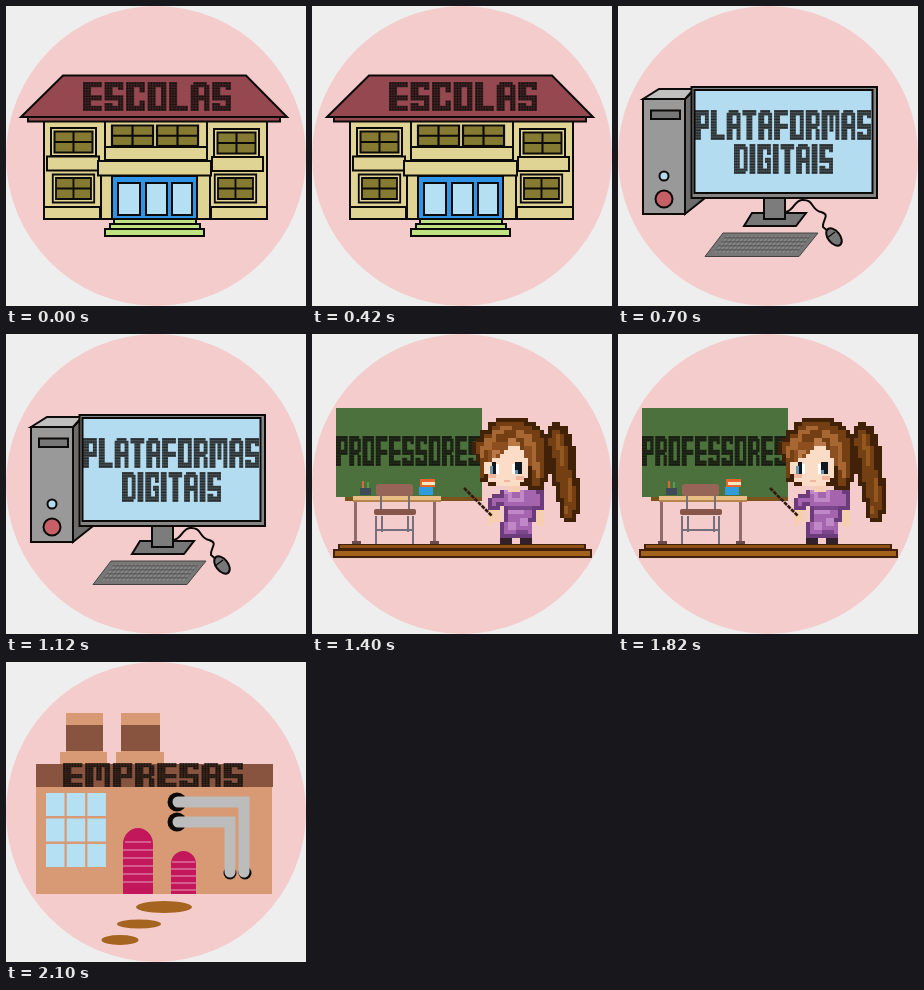
An HTML page that plays this animation: 300x300 px, repeating every 2800 ms.

```html
<!DOCTYPE html>
<html lang="pt">
<head>
<meta charset="utf-8">
<title>Escolas, plataformas digitais, professores, empresas</title>
<style>
  html, body { margin: 0; width: 100%; height: 100%; overflow: hidden; background: #eee; }
  svg { display: block; width: 100%; height: 100%; }
  .scene { visibility: hidden; animation: show 2800ms step-end infinite; }
  .s2 { animation-delay: -2100ms; }
  .s3 { animation-delay: -1400ms; }
  .s4 { animation-delay: -700ms; }
  @keyframes show { 0% { visibility: visible; } 25%, 100% { visibility: hidden; } }
  .ink { stroke: #0c0a08; stroke-width: 2; }
  .px { shape-rendering: crispEdges; }
</style>
</head>
<body>
<svg viewBox="0 0 300 300">
  <defs>
    <pattern id="dots" width="1" height="1" patternUnits="userSpaceOnUse">
      <rect width="1" height="1" fill="#0c0a08" opacity=".3"/>
      <rect x=".08" y=".08" width=".8" height=".8" fill="#0c0a08"/>
    </pattern>
    <pattern id="keys" width="4" height="4" patternUnits="userSpaceOnUse" patternTransform="skewX(-38)">
      <rect width="4" height="4" fill="#5c5c5c"/>
      <rect x=".5" y=".5" width="2.8" height="2.6" fill="#8c8c8c"/>
    </pattern>
    <g id="pane">
      <rect class="ink" width="38" height="21" fill="#857a31"/>
      <path class="ink" d="M19 0V21M0 10.5H38"/>
    </g>
    <g id="window">
      <rect class="ink" x="-3.5" y="-3.5" width="45" height="28" fill="#e0d495"/>
      <use href="#pane"/>
    </g>
  </defs>
  <rect width="300" height="300" fill="#eee"/>
  <circle cx="150" cy="150" r="150" fill="#f4cccc"/>

  <!-- School -->
  <g class="scene s1">
    <g class="ink" fill="#e0d495">
      <path d="M38 112H261V213H38Z"/>
      <path d="M99 116V140M201 116V140M95 169V213M204 169V213" fill="none"/>
      <path d="M22 111H274V115.500H22Z" fill="#964850"/>
      <path d="M15 111L57 69.500H240L281 111Z" fill="#964850"/>
    </g>
    <use href="#window" x="48.500" y="125.500"/>
    <use href="#window" x="211.500" y="126.500"/>
    <use href="#window" transform="translate(50 172) scale(.92 1)"/>
    <use href="#window" transform="translate(212 172) scale(.92 1)"/>
    <use href="#pane" transform="translate(106 119.500) scale(1.08 .97)"/>
    <use href="#pane" transform="translate(151 119.500) scale(1.08 .97)"/>
    <g class="ink" fill="#e0d495">
      <path d="M41 150.500H93V164.500H41ZM206 151H257V165H206ZM38 201H94V213H38ZM205 201H261V213H205Z"/>
      <path d="M99 141H201V154H99ZM92 155H205V169.500H92Z"/>
      <path d="M106 170H191V213H106Z" fill="#2f94e6"/>
      <path d="M112 177H134V209H112ZM140 177H161V209H140ZM166 177H186V209H166Z" fill="#b5dff2"/>
      <path d="M108 213H190V218H108ZM104 218H194V223H104ZM99 223H198V230H99Z" fill="#bfe383"/>
    </g>
    <g data-word="ESCOLAS" data-box="77 76 148 29"></g>
  </g>

  <!-- Computer -->
  <g class="scene s2">
    <g class="ink">
      <path d="M67 93L74 86V192H87L67 208Z" fill="#6c6c6c"/>
      <path d="M25 93L41 83H76L67 93Z" fill="#c0c0c0"/>
      <path d="M25 93H67V208H25Z" fill="#999"/>
      <path d="M33 104.500H62V113H33Z" fill="#777"/>
      <circle cx="46" cy="170" r="4.500" fill="#b4dcf0"/>
      <circle cx="46" cy="193" r="8.500" fill="#c75f66"/>
      <path d="M134 207H188L178 220H126Z" fill="#777"/>
      <path d="M146 192H167V213H146Z" fill="#7c7c7c"/>
      <path d="M73.500 81H259V192H73.500Z" fill="#858585"/>
      <path d="M76.500 84H254.500V187H76.500Z" fill="#b4dcf0"/>
      <path d="M168 206C176 204 176 195 184 194C196 193 193 204 203 206C213 209 204 214 205 221L211 226" fill="none"/>
      <ellipse cx="216" cy="231" rx="6" ry="10" transform="rotate(-38 216 231)" fill="#777"/>
      <path d="M209 232L217 226" stroke-width="1.300"/>
    </g>
    <path d="M105 227H200L181 250.500H87Z" fill="#777" stroke="#444"/>
    <path d="M108 230H193L179 247H95Z" fill="url(#keys)"/>
    <g data-word="PLATAFORMAS" data-box="77 104 176 30"></g>
    <g data-word="DIGITAIS" data-box="116 138 99 30"></g>
  </g>

  <!-- Classroom -->
  <g class="scene s3">
    <path d="M24 74H170V163H24Z" fill="#4c713c"/>
    <g data-word="PROFESSORES" data-box="24 102 144 30"></g>
    <g class="px">
      <path d="M33 163H170V167H33Z" fill="#7b531f"/>
      <path d="M26 210H274V216H26ZM21 215H280V224H21Z" fill="#42210c"/>
      <path d="M28 211H272V214H28Z" fill="#8c5014"/>
      <path d="M23 217H278V222H23Z" fill="#a3621c"/>
      <path d="M42 168H45V208H42ZM121 168H124V208H121Z" fill="#916a6c"/>
      <path d="M40 207H49V210H40ZM118 207H127V210H118Z" fill="#6b4a4c"/>
      <path d="M41 162H129V168H41Z" fill="#e8bd83"/>
      <path d="M41 166H129V168H41Z" fill="#b5844f"/>
      <path d="M48 154H59V161H48Z" fill="#3d4b58"/>
      <path d="M50 147H52V154H50Z" fill="#d66b3c"/>
      <path d="M55 148H57V154H55Z" fill="#5a9a50"/>
      <path d="M107 153H121V161H107Z" fill="#2f9bd8"/>
      <path d="M108 145H123V153H108Z" fill="#e8652d"/>
      <path d="M110 148H123V151H110Z" fill="#f6e6c2"/>
    </g>
    <path d="M64 210V182M101 210V182M70 198V182M96 198V182M64 196H101M69 160V178M97 160V178" stroke="#75707c" stroke-width="2"/>
    <rect x="64" y="150" width="37" height="12" rx="3" fill="#966558"/>
    <rect x="62" y="175" width="42" height="6" rx="2" fill="#86564a"/>
    <!-- Teacher, on a grid of 4 px cells -->
    <g class="px" transform="translate(160 84) scale(4)">
      <path d="M17 4H19V2H20V1H22V2H24V4H25V7H26V15H27V24H26V26H23V25H22V21H21V17H20V14H17Z" fill="#412108"/>
      <path d="M20 3H22V4H23V7H24V13H25V17H26V23H25V25H23V20H22V16H21V10H20V7H19V5H20Z" fill="#743f12"/>
      <path d="M21 4H22V7H23V12H22V8H21ZM24 15H25V21H24ZM23 22H24V24H23Z" fill="#955720"/>
      <path d="M6 0H14V1H16V2H17V3H18V5H19V16H18V18H14V17H4V16H2V11H1V9H0V6H1V5H2V3H4V1H6Z" fill="#412108"/>
      <path d="M6 1H13V2H15V3H17V5H18V15H17V17H15V8H12V7H5V9H4V12H3V15H2V9H1V6H3V4H5V2H6Z" fill="#743f12"/>
      <path d="M7 2H10V3H8V4H6V6H5V8H3V10H2V7H3V5H5V3H7ZM11 3H13V4H15V6H16V11H17V15H16V13H15V7H13V5H11Z" fill="#a76733"/>
      <path d="M8 7H12V8H13V9H14V15H13V16H12V17H6V16H4V14H3V11H4V10H6V9H8Z" fill="#fbdcc6"/>
      <path d="M5 6H9V8H8V9H7V10H5V11H4V8H5ZM13 7H15V12H14V10H13Z" fill="#8d4f20"/>
      <path d="M5 8H7V9H6V10H5ZM9 5H11V6H12V7H9Z" fill="#b97845"/>
      <path d="M4 14H6V15H4ZM11 14.500H13V15.500H11ZM8 15.500H9.500V16H8Z" fill="#f1b49f"/>
      <path d="M5 11H6V14H5ZM10.700 11H12.600V14H10.700Z" fill="#101820"/>
      <path d="M4.500 12H5.300V14H4.500ZM10.700 13H11.500V14H10.700Z" fill="#6d96ae"/>
      <path d="M6 11.500H6.700V14H6ZM10 11.500H10.700V14H10Z" fill="#fff"/>
      <path d="M7 18H9V17H12V18H18V23H16V26H15V30H7V26H8V22H7V23H4V20H5V19H7Z" fill="#6b3b7b"/>
      <path d="M8 18H16V19H17V22H15V25H14V26H15V29H8V26H9V22H8V21H6V22H5V20H8Z" fill="#a465ae"/>
      <path d="M8 18H10V20H12V18H13V21H9V19H8ZM9 23H13V24H9ZM9 26H11V28H9ZM12 25H14V27H12Z" fill="#c188c7"/>
      <path d="M9 22H15V23H9ZM11 28H14V29H11Z" fill="#7c468b"/>
      <path d="M9 17H12V18.500H9ZM4 23H7V26H5V27H4ZM16 23H18V27H16Z" fill="#f5cfb0"/>
      <path d="M7 30H10V31.500H7ZM12 30H15V31.500H12Z" fill="#33202a"/>
    </g>
    <path d="M152 154L180 182" stroke="#30190f" stroke-width="2.600" stroke-dasharray="4 1"/>
  </g>

  <!-- Factory -->
  <g class="scene s4">
    <path d="M60 51H97V90H101V102H54V90H60ZM115 51H154V90H158V102H110V90H115ZM30 124H266V232H30Z" fill="#d79a74"/>
    <path d="M60 63H97V89H60ZM115 63H154V89H115ZM30 102H267V125H30Z" fill="#88543f"/>
    <g id="panes" fill="#b5dff2"></g>
    <g fill="#0c0a08">
      <circle cx="171" cy="140" r="9.500"/><circle cx="171" cy="160" r="9.500"/>
      <circle cx="224" cy="211" r="6.500"/><circle cx="239" cy="211" r="6.500"/>
    </g>
    <path d="M172 140H238V210M172 160H224V210" fill="none" stroke="#bcbcbc" stroke-width="11" stroke-linecap="round"/>
    <path d="M117 232V182A15 16 0 0 1 147 182V232ZM165 232V202A12.500 13 0 0 1 190 202V232Z" fill="#c2185b"/>
    <path d="M119 180H145M117 188H147M117 196H147M117 204H147M117 212H147M117 220H147M166 200H189M165 207H190M165 214H190M165 221H190M165 228H190" stroke="#d65a8b" stroke-width="2"/>
    <g fill="#a5641f">
      <ellipse cx="158" cy="245" rx="28" ry="6"/>
      <ellipse cx="133" cy="262" rx="22" ry="4.500"/>
      <ellipse cx="114" cy="278" rx="18.500" ry="5"/>
    </g>
    <g data-word="EMPRESAS" data-box="57 101 180 24"></g>
  </g>
</svg>
<script>
  // Lettering is assembled from bars on a grid 11 cells high.
  const bars = {
    a: 'M0 0h3v6h-3z', b: 'M0 5h3v6h-3z', c: 'M5 0h2v6h-2z', d: 'M5 5h2v6h-2z',
    t: 'M0 0h7v2h-7z', m: 'M0 5h7v2h-7z', u: 'M0 9h7v2h-7z',
    p: 'M5 0h2v4h-2z', q: 'M5 7h2v4h-2z', n: 'M0 5h6v2h-6z',
    s: 'M5 0h2v3h-2z', z: 'M0 8h3v3h-3z',
    r: 'M1 0h5v2h-5z', l: 'M0 1h3v5h-3z', k: 'M5 1h2v5h-2z',
    o: 'M0 0h6v2h-6z', v: 'M0 9h6v2h-6z', e: 'M5 1h2v9h-2z',
    g: 'M4 5h3v2h-3z', x: 'M2 0h3v11h-3z', i: 'M0 0h3v11h-3z',
    w: 'M0 0h9v2h-9zM4 0h2v8h-2zM7 0h2v11h-2z'
  };
  const glyphs = {
    A: 'lbrkdm', C: 'abtupq', D: 'above', E: 'abtmu', F: 'abtm', G: 'abtupqg', I: 'i',
    L: 'abu', M: 'abw', O: 'abcdtu', P: 'abctm', R: 'abokqn', S: 'adtmusz', T: 'tx'
  };
  const width = ch => ({ I: 3, M: 9 }[ch] || 7);
  const NS = 'http://www.w3.org/2000/svg';
  const add = (parent, tag, attrs) => {
    const el = document.createElementNS(NS, tag);
    for (const key in attrs) el.setAttribute(key, attrs[key]);
    return parent.appendChild(el);
  };

  for (const g of document.querySelectorAll('[data-word]')) {
    const { word, box } = g.dataset;
    const [x, y, w, h] = box.split(' ').map(Number);
    let pen = 0;
    for (const ch of word) {
      const d = [...glyphs[ch]].map(k => bars[k]).join('');
      add(g, 'path', { d, fill: 'url(#dots)', transform: `translate(${pen} 0)` });
      pen += width(ch) + 1;
    }
    g.setAttribute('transform', `translate(${x} ${y}) scale(${w / (pen - 1)} ${h / 11})`);
    g.setAttribute('role', 'img');
    g.setAttribute('aria-label', word);
  }

  const panes = document.getElementById('panes');
  for (let i = 0; i < 9; i++)
    add(panes, 'rect', { x: 40 + i % 3 * 20.7, y: 131 + Math.floor(i / 3) * 25.5, width: 18.5, height: 23 });
</script>
</body>
</html>
```
